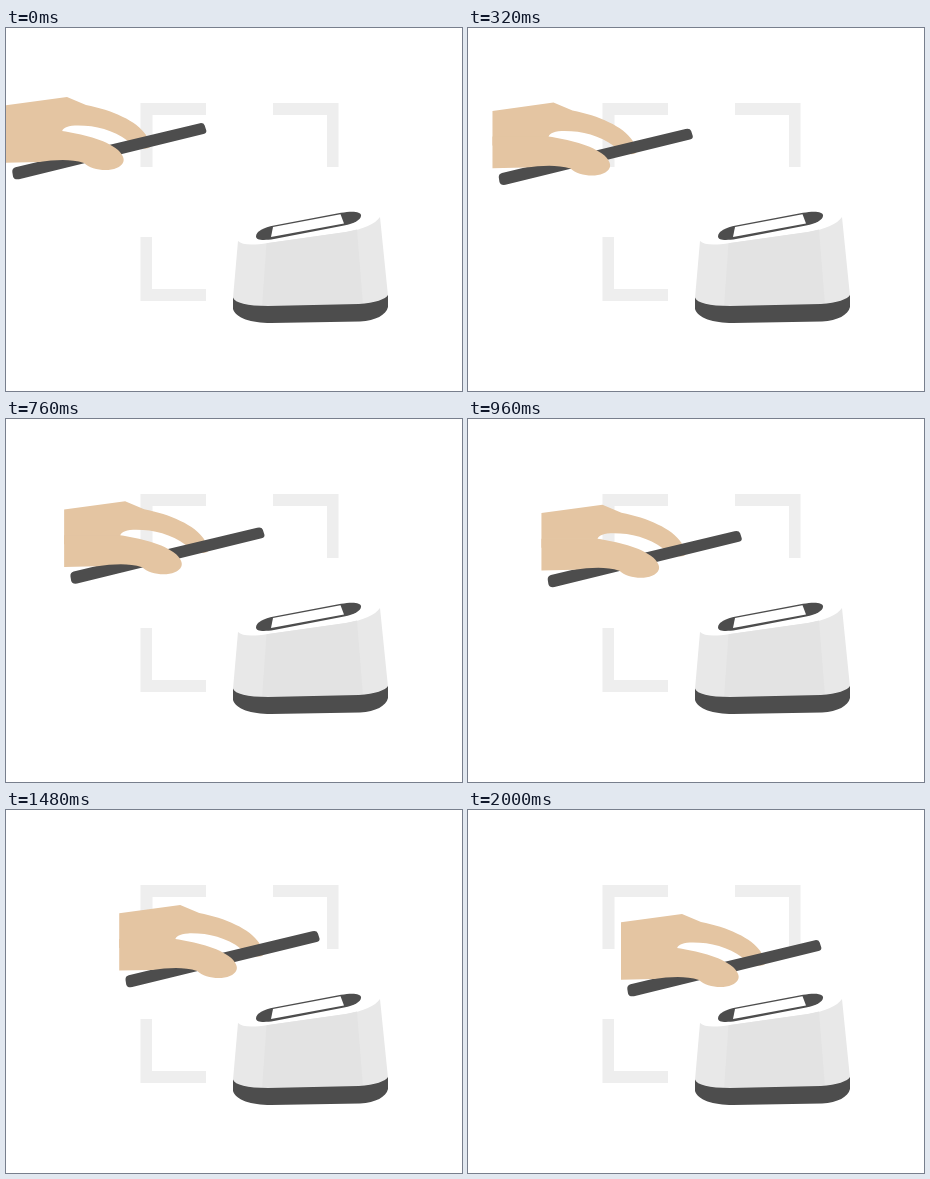
An HTML page for the animation above (3.2 s loop, 456 by 363 pixels).

```html
<!DOCTYPE html>
<html lang="en">
<head>
<meta charset="utf-8">
<title>Phone and scanner</title>
<style>
  html, body { margin: 0; width: 100%; height: 100%; overflow: hidden; background: #fff; }
  svg { display: block; width: 100vw; height: 100vh; }
  .frame { fill: #eee; }
  .skin { fill: #e4c5a2; }
  .dark { fill: #4d4d4d; }
  .side { fill: #e8e8e8; }
  .front { fill: #e3e3e3; }
  .white { fill: #fff; }
</style>
</head>
<body>
<svg viewBox="0 0 456 363">
  <path class="frame" d="M134.500 75H200V87H146.500V139H134.500Z
    M267 75H332.500V139H321V87H267Z
    M134.500 209H146V261H200V273H134.500Z"/>

  <g id="scanner">
    <path class="side" d="M232 213C236 217 246 217.500 262 215L340 204C358 201 369 196 374 189L382 268
      C380 273 370 276 355 277L262 279C240 279 229 275 227 270Z"/>
    <path class="front" d="M260.500 215.200L340 204L351 201.500L357 277L256 279Z"/>
    <path class="dark" d="M227 269.500C229 275 241 278 262 278L353 276C369 275 380 271 382 267V279
      C380 287 370 292.500 354 293.500L265 295C245 295 230 290 227 281Z"/>
    <path class="dark" d="M250 208.500C250 203 258 199.500 268 197.500L335 184.800C345 183 355 183 355 187.500
      C355 192 348 195.500 338 197.500L268 211C258 212.500 250 212.500 250 208.500Z"/>
    <path class="white" d="M267 199L334.500 186.200L338 195.500L265 209Z"/>
  </g>

  <g id="hand">
    <path class="skin" d="M0 77.300L61 69L80 77C106 82 131 93 140 107L144 119C142 121 138 121 136 120L122 113
      C106 101 88 97 69 97.500C60 98 56 101 56 104L50 112H0Z"/>
    <path class="dark" d="M9.500 139.300L193 95.400Q197.500 94.300 198.700 97.500L200.300 102.500
      Q200.800 105.200 197.500 106L13 151.200Q8 152 7 148.500L6.300 144Q6 140.200 9.500 139.300Z"/>
    <path class="skin" d="M0 103H56C75 106 99 111 112 122C117 127 118.500 131 117.300 134
      C113 145 87 144 78 135C64 130.500 48 132 33 134L0 134.700Z"/>
  </g>
</svg>
<script>
  const LOOP = 3200, STEP = 40, STEPS = 50;
  const TRAVEL = { x: 153, y: 35 };
  const hand = document.getElementById('hand');

  function draw(now) {
    const step = Math.min(STEPS, Math.floor((now % LOOP) / STEP));
    const progress = step / STEPS;
    hand.setAttribute('transform', `translate(${TRAVEL.x * progress} ${TRAVEL.y * progress})`);
  }

  let start;
  function tick(now) {
    start ??= now;
    draw(now - start);
    requestAnimationFrame(tick);
  }
  draw(0);
  requestAnimationFrame(tick);
</script>
</body>
</html>
```
